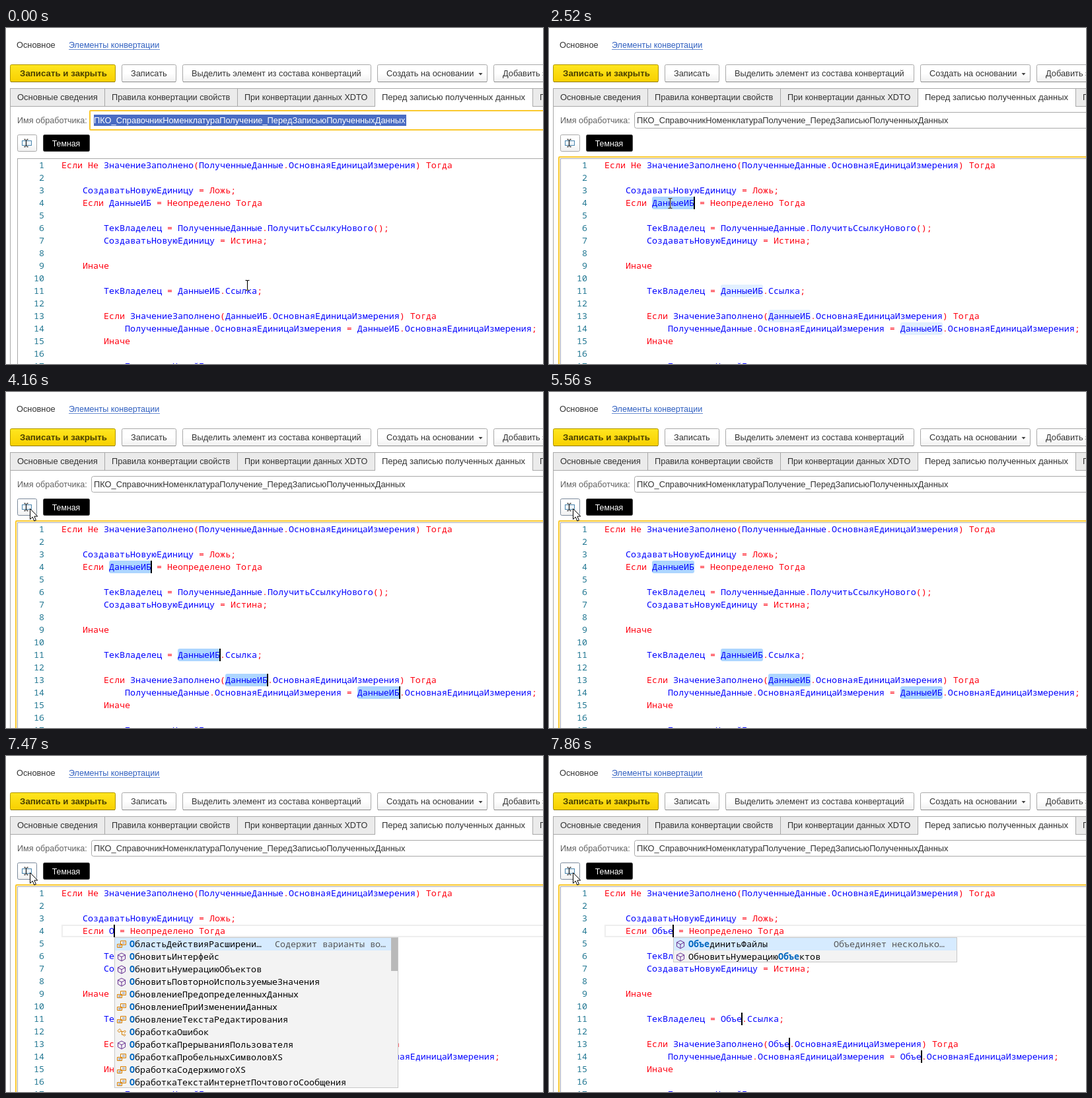
An HTML page for the animation above (8000 ms loop, 813 px wide and 508 px high).

```html
<!DOCTYPE html>
<html lang="ru">
<head>
<meta charset="utf-8">
<title>Редактор обработчика</title>
<style>
  html, body { margin: 0; width: 100%; height: 100%; overflow: hidden; background: #fff; }
  svg { display: block; width: 813px; height: 508px; font-family: "Liberation Sans", Arial, sans-serif; }
  text { white-space: pre; }
  .mono { font: 13.3333px "Noto Sans Mono", monospace; }
  .btn { fill: url(#face); stroke: #a9a9a9; }
  .tab { fill: #ebebeb; stroke: #a9a9a9; }
  .key { fill: #ff0010; }
  .name { fill: #0000ff; }
  .num { fill: #237893; text-anchor: end; }
  .hit { fill: #0066bf; font-weight: 600; }
  .focus { fill: none; stroke: #fac92f; stroke-width: 2; }
  .line { fill: none; stroke: #a9a9a9; }
  .hover { stroke: #7c8b9c; }
  #beam { mix-blend-mode: difference; }
</style>
</head>
<body>
<svg viewBox="0 0 813 508" font-size="12.8" fill="#333">
  <defs>
    <linearGradient id="face" x2="0" y2="1">
      <stop offset=".5" stop-color="#fff"/><stop offset="1" stop-color="#f0f0f0"/>
    </linearGradient>
    <linearGradient id="gold" x2="0" y2="1">
      <stop offset="0" stop-color="#ffe61f"/><stop offset="1" stop-color="#f8d000"/>
    </linearGradient>
    <g id="cube" fill="none" stroke="#652d90">
      <path d="M7 1L12.5 3.8V10L7 13L1.5 10V3.8ZM1.5 3.8L7 6.8L12.5 3.8M7 6.8V13"/>
    </g>
    <g id="enum" fill="#f6f2ea" stroke="#d67e00">
      <path d="M5.5 1.5h8v6h-8zM.5 6.5h7v5h-7z"/>
      <path d="M8 3.5h4M8 5.5h4M2 8.5h4M2 10h4" stroke="#75809c" stroke-width=".8"/>
    </g>
    <g id="class" fill="none" stroke="#d67e00">
      <path d="M1 4.5L4 1.5L6.5 4L3.5 7ZM5.5 5.5H10M7.5 5.5V10.5H9.5M10 5.5l1.7-1.7 1.7 1.7-1.7 1.7zM9.5 10.8l1.7-1.7 1.7 1.7-1.7 1.7z"/>
    </g>
  </defs>
  <rect width="813" height="508" fill="#fff"/>

  <text x="16" y="30">Основное</text>
  <text x="95" y="30" font-size="12.55" fill="#2f5fc0">Элементы конвертации</text>
  <path d="M95 32.5H233" stroke="#6d8fd2"/>

  <rect x="6.5" y="55.5" width="159" height="26" rx="2" fill="url(#gold)" stroke="#ad9400"/>
  <rect class="btn" x="175.5" y="55.5" width="82" height="26" rx="2"/>
  <rect class="btn" x="267.5" y="55.5" width="285" height="26" rx="2"/>
  <rect class="btn" x="562.5" y="55.5" width="166" height="26" rx="2"/>
  <rect class="btn" x="738.5" y="55.5" width="120" height="26" rx="2"/>
  <path d="M7 81.5H165" stroke="#8f7a00"/>
  <path d="M176 81.5H257M268 81.5H552M563 81.5H728M739 81.5H813" stroke="#8c8c8c"/>
  <text x="87" y="73" font-size="13.3" font-weight="bold" text-anchor="middle" fill="#4a4000">Записать и закрыть</text>
  <text x="189" y="73">Записать</text>
  <text x="281" y="73" font-size="12.75">Выделить элемент из состава конвертаций</text>
  <text x="576" y="73" font-size="12.75">Создать на основании</text>
  <path d="M715.5 68h6l-3 3.5z" fill="#444"/>
  <text x="752" y="73">Добавить э</text>

  <path class="line" d="M6.5 118V508"/>
  <rect class="tab" x="6.5" y="91.5" width="143" height="27"/>
  <rect class="tab" x="149.5" y="91.5" width="201" height="27"/>
  <rect class="tab" x="350.5" y="91.5" width="208" height="27"/>
  <rect class="tab" x="797.5" y="91.5" width="60" height="27"/>
  <path class="line" d="M558.5 118V91.5H797.5V118"/>
  <text x="17" y="109" font-size="13">Основные сведения</text>
  <text x="160" y="109" font-size="12.73">Правила конвертации свойств</text>
  <text x="361" y="109" font-size="12.63">При конвертации данных XDTO</text>
  <text x="569" y="109" font-size="13">Перед записью полученных данных</text>
  <text x="808" y="109">П</text>

  <text x="17" y="144" font-size="12.6" fill="#606060">Имя обработчика:</text>
  <rect id="fieldBox" class="line" x="129.5" y="127.5" width="720" height="24" rx="3"/>
  <g id="fieldFocus">
    <rect class="focus" x="127" y="125" width="720" height="29" rx="1"/>
    <rect x="133" y="131" width="473" height="17" fill="#4a6cc3"/>
  </g>
  <text id="fieldText" x="133" y="144" font-size="12.83">ПКО_СправочникНоменклатураПолучение_ПередЗаписьюПолученныхДанных</text>

  <rect id="tool" class="btn" x="17.5" y="161.5" width="29" height="25" rx="2"/>
  <rect x="24.5" y="170.5" width="14" height="7" fill="#edf5fb" stroke="#4c86ad"/>
  <path d="M28 168.5h2M32 168.5h2M28 179.5h2M32 179.5h2M31 169V179" transform="translate(-.5 0)" fill="none" stroke="#222" stroke-width="1.3"/>
  <rect x="56.5" y="161.5" width="70" height="25" rx="2" fill="#000" stroke="#444"/>
  <text x="91" y="179" font-size="12.3" text-anchor="middle" fill="#fff">Темная</text>

  <rect class="line" x="17.5" y="197.5" width="830" height="400"/>
  <rect id="editFocus" class="focus" x="15" y="195" width="840" height="400" rx="1"/>
  <g id="code" class="mono"></g>
  <g id="popup" class="mono"></g>
  <path id="beam" d="M-3-7.5H-1L0-6.5L1-7.5H3M0-6.5V6.5M-3 7.5H-1L0 6.5L1 7.5H3" fill="none" stroke="#fff" stroke-width="1.1"/>
  <path id="arrow" d="M.5.5V16.5L4.2 13L6.8 19L9.4 17.9L6.9 12H11.8Z" fill="#fff" stroke="#000"/>
</svg>
<script>
const LOOP = 8000, LEFT = 84, TOP = 198, ROW = 19, CELL = 8;
const $ = id => document.getElementById(id);

// "@" stands for the word being renamed
const source = [
  'Если Не ЗначениеЗаполнено(ПолученныеДанные.ОсновнаяЕдиницаИзмерения) Тогда',
  '',
  '    СоздаватьНовуюЕдиницу = Ложь;',
  '    Если @ = Неопределено Тогда',
  '',
  '        ТекВладелец = ПолученныеДанные.ПолучитьСсылкуНового();',
  '        СоздаватьНовуюЕдиницу = Истина;',
  '',
  '    Иначе',
  '',
  '        ТекВладелец = @.Ссылка;',
  '',
  '        Если ЗначениеЗаполнено(@.ОсновнаяЕдиницаИзмерения) Тогда',
  '            ПолученныеДанные.ОсновнаяЕдиницаИзмерения = @.ОсновнаяЕдиницаИзмерения;',
  '        Иначе',
  '',
  '            ПараметрыНовойЕдиницы ='
];
const keywords = new Set(['Если', 'Не', 'Тогда', 'Иначе', 'Ложь', 'Истина', 'Неопределено']);
const spots = source
  .map((s, i) => ({ x: LEFT + s.indexOf('@') * CELL, y: TOP + i * ROW, found: s.includes('@') }))
  .filter(s => s.found);

const longList = [
  ['enum', 'ОбластьДействияРасширени…'],
  ['cube', 'ОбновитьИнтерфейс'],
  ['cube', 'ОбновитьНумерациюОбъектов'],
  ['cube', 'ОбновитьПовторноИспользуемыеЗначения'],
  ['enum', 'ОбновлениеПредопределенныхДанных'],
  ['enum', 'ОбновлениеПриИзмененииДанных'],
  ['enum', 'ОбновлениеТекстаРедактирования'],
  ['class', 'ОбработкаОшибок'],
  ['cube', 'ОбработкаПрерыванияПользователя'],
  ['enum', 'ОбработкаПробельныхСимволовXS'],
  ['enum', 'ОбработкаСодержимогоXS'],
  ['enum', 'ОбработкаТекстаИнтернетПочтовогоСообщения']
];
const shortList = [['cube', 'ОбъединитьФайлы'], ['cube', 'ОбновитьНумерациюОбъектов']];

// Timelines: [start, value...]
const words = [[0, 'ДанныеИБ'], [7470, 'О'], [7620, 'Об'], [7740, 'Объ'], [7860, 'Объе']];
const modes = [[0, 'none'], [2370, 'click'], [2520, 'one'], [4010, 'idle'], [4160, 'all'], [7470, 'type']];
const blinks = [0, 2370, 3010, 3580, 3860, 4160, 4530, 5030, 5560, 6060, 6560, 7090]
  .map((t, i) => [t, i % 2 === 1]);
const moves = [
  [0, 365.5, 389], [810, 331.5, 348], [940, 294.5, 303], [1090, 250.5, 265],
  [1230, 227.5, 254], [1380, 211.5, 249], [1500, 196.5, 247], [1650, 183.5, 265],
  [2890, 152.5, 246], [3010, 120.5, 227], [3160, 86.5, 199],
  [3310, 48, 179], [3460, 39, 177], [3580, 36, 176]
];
const at = (list, t) => list.filter(e => e[0] <= t).pop();

const rect = (x, y, w, h, fill, more = '') =>
  `<rect x="${x}" y="${y}" width="${w}" height="${h}" fill="${fill}" ${more}/>`;
const label = (x, y, body, more = '') => `<text x="${x}" y="${y}" ${more}>${body}</text>`;
const paint = line => line.replace(/[А-Яа-я]+|[^А-Яа-я]+/g, s =>
  `<tspan class="${/[А-Яа-я]/.test(s) && !keywords.has(s) ? 'name' : 'key'}">${s}</tspan>`);

function drawCode(word, mode, caret) {
  const size = word.length * CELL;
  const many = mode === 'all' || mode === 'type';
  let out = '';
  if (mode === 'type') out += rect(85, 256, 760, 17, 'none', 'stroke="#eee" stroke-width="2"');
  if (['one', 'idle', 'all'].includes(mode)) {
    spots.forEach((s, i) => {
      const main = mode === 'idle' ? '#e5ebf1' : '#add6ff';
      out += rect(s.x, s.y, size, ROW, many || !i ? main : '#e2f0ff', 'rx="3"');
    });
  }
  source.forEach((line, i) => {
    const y = TOP + 14 + i * ROW;
    out += label(58, y, i + 1, 'class="num"') + label(LEFT, y, paint(line.replace('@', word)));
  });
  if (caret) {
    const shift = mode === 'click' ? 3 * CELL : size;
    spots.slice(0, many ? 4 : 1).forEach(s => out += rect(s.x + shift - 1, s.y, 2, ROW, '#000'));
  }
  $('code').innerHTML = out;
}

function drawPopup(word, open) {
  if (!open) { $('popup').innerHTML = ''; return; }
  const brief = word.length > 2;
  const list = brief ? shortList : longList;
  const x = spots[0].x + word.length * CELL, y = 274;
  let out = rect(x + .5, y + .5, 429, list.length * ROW - (brief ? 1 : 1), '#f3f3f3', 'stroke="#c8c8c8"')
    + rect(x + 1, y + 1, 428, ROW, '#d6ebff');
  list.forEach(([icon, name], i) => {
    const base = y + 15 + i * ROW;
    const text = name.replace(word, `<tspan class="hit">${word}</tspan>`);
    out += `<use href="#${icon}" x="${x + 4}" y="${base - 11}"/>` + label(x + 23, base, text, 'fill="#000"');
  });
  out += label(x + 243, y + 15, brief ? 'Объединяет несколько…' : 'Содержит варианты во…', 'fill="#555"');
  if (!brief) out += rect(x + 419, y + 1, 10, 50, '#b9b9b9');
  $('popup').innerHTML = out;
}

const show = (id, on) => $(id).style.display = on ? '' : 'none';
let last = '';

function render(t) {
  const word = at(words, t)[1], mode = at(modes, t)[1], caret = at(blinks, t)[1];
  const [start, x, y] = at(moves, t);
  const key = [word, mode, caret, start].join();
  if (key === last) return;
  last = key;

  const editing = t >= 2520, arrow = t >= 3310;
  show('fieldFocus', !editing);
  show('fieldBox', editing);
  show('editFocus', editing);
  $('fieldText').setAttribute('fill', editing ? '#333' : '#fff');
  $('tool').setAttribute('class', t >= 3460 ? 'btn hover' : 'btn');
  show('beam', !arrow);
  show('arrow', arrow);
  $(arrow ? 'arrow' : 'beam').setAttribute('transform', `translate(${x} ${y})`);
  drawCode(word, mode, caret);
  drawPopup(word, mode === 'type');
}

const begin = performance.now();
function tick() {
  render((performance.now() - begin) % LOOP);
  requestAnimationFrame(tick);
}
tick();
</script>
</body>
</html>
```
